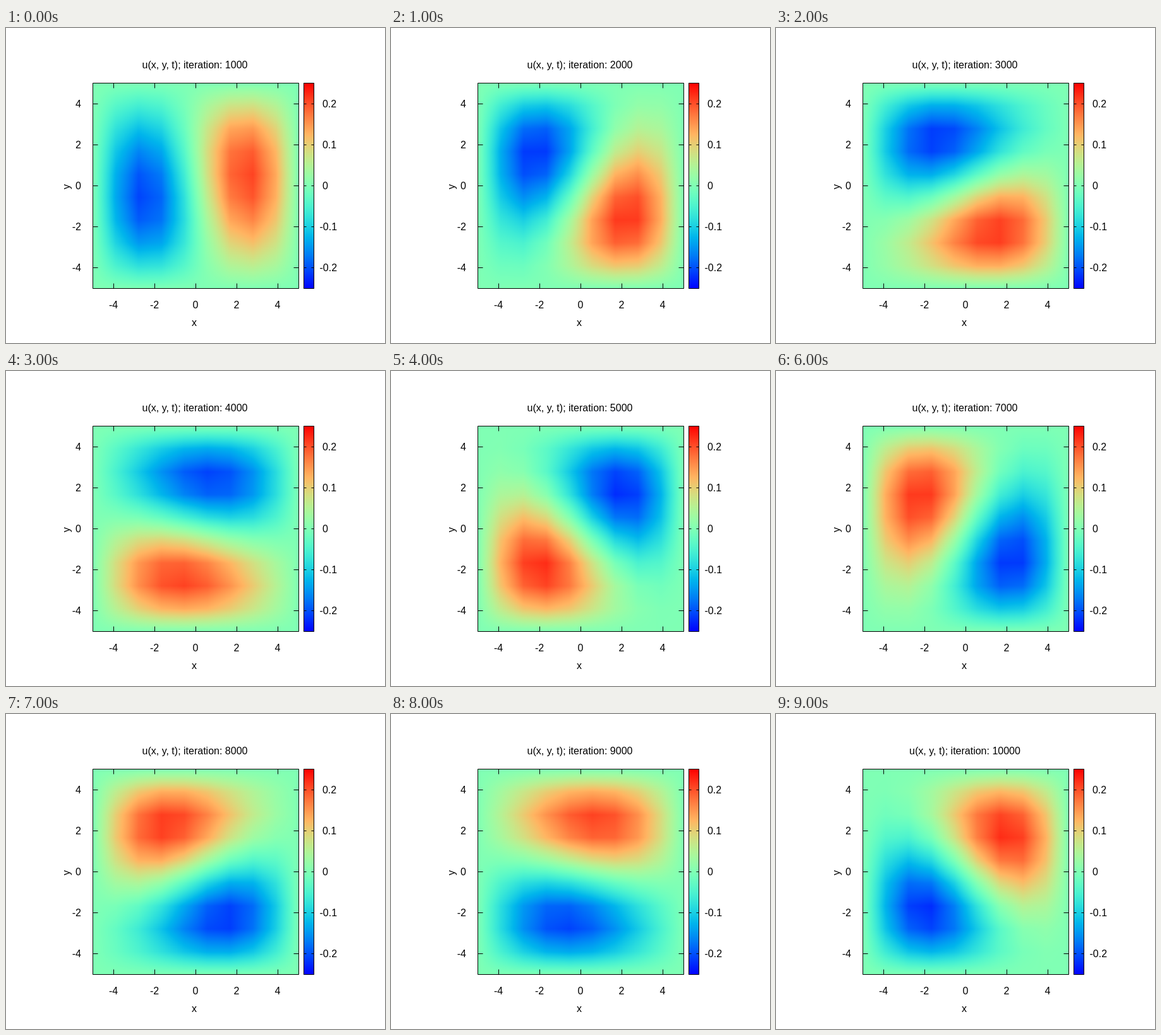
Animation of 600x500 px, one loop 10000 ms. Source, as an HTML page with a canvas:

```html
<!DOCTYPE html>
<html>
<head>
<meta charset="utf-8">
<style>
html, body { margin: 0; width: 100%; height: 100%; overflow: hidden; background: #fff; }
canvas, svg { position: absolute; left: 0; top: 0; }
text { font: 16px "Liberation Sans", Arial, sans-serif; white-space: pre; }
path { fill: none; stroke: #000; }
</style>
</head>
<body>
<canvas id="field" width="600" height="500"></canvas>
<svg id="labels" width="600" height="500"></svg>
<script>
const LEFT = 137, TOP = 87, SIZE = 326, BAR_LEFT = 471, BAR_WIDTH = 17;
const CELLS = 9, AMPLITUDE = 0.42, RANGE = 0.25;
const START_ANGLE = 7, STEP_ANGLE = 36;
const ctx = document.getElementById("field").getContext("2d");
const svg = document.getElementById("labels");

function add(tag, attributes, content = "") {
  const node = document.createElementNS("http://www.w3.org/2000/svg", tag);
  for (const name in attributes) node.setAttribute(name, attributes[name]);
  node.textContent = content;
  svg.append(node);
  return node;
}
const label = (x, y, content, anchor = "middle") =>
  add("text", { x, y, "text-anchor": anchor }, content);

const clamp = v => Math.max(0, Math.min(1, v));

// Rainbow palette: blue, cyan, mint, orange, red
function color(value) {
  const p = clamp(0.5 + value / (2 * RANGE));
  return [clamp(2 * p - 0.5), Math.sin(Math.PI * p), Math.cos(Math.PI * p / 2)]
    .map(v => Math.round(255 * v));
}

function paint(left, width, valueAt) {
  const image = ctx.createImageData(width, SIZE + 1);
  for (let y = 0, i = 0; y <= SIZE; y++) {
    for (let x = 0; x < width; x++, i += 4) {
      image.data.set([...color(valueAt(x, y)), 255], i);
    }
  }
  ctx.putImageData(image, left, TOP);
}

// Two orthogonal membrane modes, sampled on a coarse grid
function sampleGrid(angle) {
  const a = Math.cos(angle), b = Math.sin(angle);
  const phase = i => Math.PI * (i / CELLS - 0.5);
  return Array.from({ length: CELLS + 1 }, (_, row) =>
    Array.from({ length: CELLS + 1 }, (_, col) => {
      const x = phase(col), y = -phase(row);
      return AMPLITUDE * Math.cos(x) * Math.cos(y) * (a * Math.sin(x) + b * Math.sin(y));
    }));
}

function paintField(step) {
  const grid = sampleGrid((START_ANGLE - STEP_ANGLE * step) * Math.PI / 180);
  const mix = (a, b, f) => a + (b - a) * f;
  paint(LEFT, SIZE + 1, (x, y) => {
    const gx = x / SIZE * CELLS, gy = y / SIZE * CELLS;
    const col = Math.min(CELLS - 1, Math.floor(gx));
    const row = Math.min(CELLS - 1, Math.floor(gy));
    const across = r => mix(grid[r][col], grid[r][col + 1], gx - col);
    return mix(across(row), across(row + 1), gy - row);
  });
}

function drawAxes() {
  const l = LEFT + 0.5, t = TOP + 0.5, r = l + SIZE, b = t + SIZE;
  const bl = BAR_LEFT + 0.5, br = bl + BAR_WIDTH - 1;
  let d = `M${l} ${t}H${r}V${b}H${l}ZM${bl} ${t}H${br}V${b}H${bl}Z`;
  for (let n = -4; n <= 4; n += 2) {
    const offset = Math.round((n + 5) / 10 * SIZE);
    const x = l + offset, y = b - offset;
    d += `M${x} ${b}v-8M${x} ${t}v8M${l} ${y}h8M${r} ${y}h-8`;
    d += `M${bl} ${y}h4M${br} ${y}h-4`;
    label(x - 0.5, 445, n);
    label(119, y + 5, n, "end");
    label(496.5, y + 5, (n < 0 ? "" : " ") + n / 20, "start");
  }
  add("path", { d });
  label(298, 473, "x");
  add("text", { transform: "translate(101 252) rotate(-90)", "text-anchor": "middle" }, "y");
}

paint(BAR_LEFT, BAR_WIDTH, (x, y) => RANGE * (1 - 2 * y / SIZE));
drawAxes();
const title = label(299, 64, "");
let shown = -1;

function frame() {
  const step = Math.floor(performance.now() / 1000) % 10;
  if (step !== shown) {
    shown = step;
    paintField(step);
    title.textContent = `u(x, y, t); iteration: ${(step + 1) * 1000}`;
  }
  requestAnimationFrame(frame);
}
frame();
</script>
</body>
</html>
```
